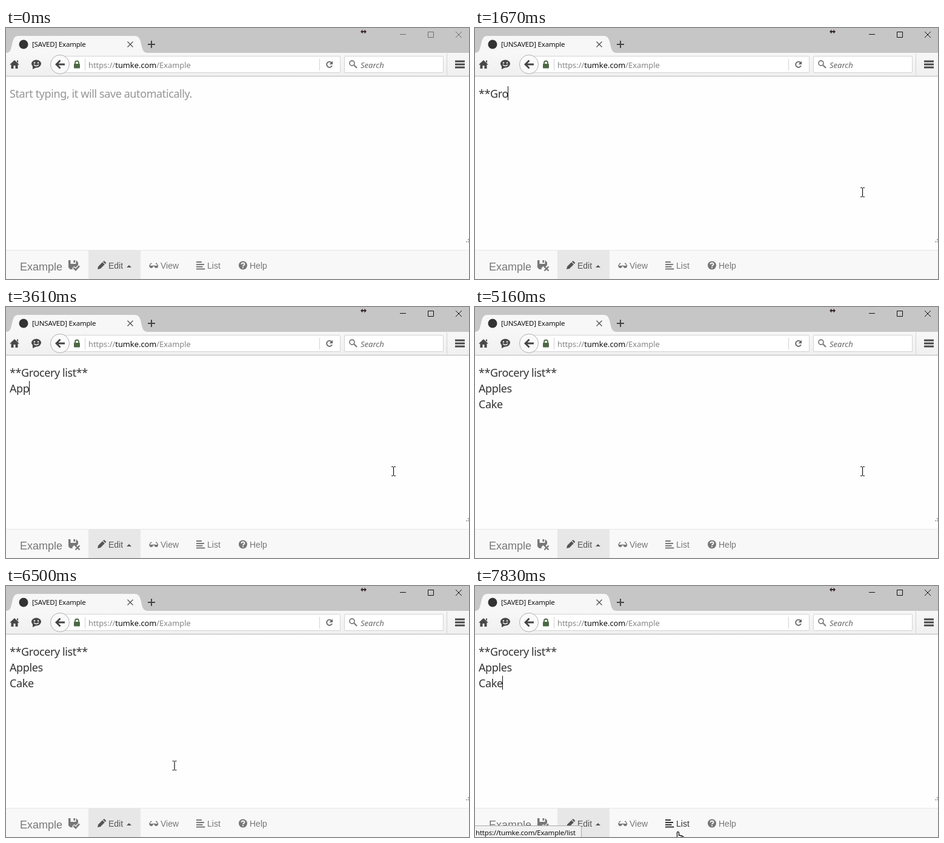
Recreate the animation shown at these times as an HTML page. Size 764x414 px, loop 8 s.

```html
<!DOCTYPE html>
<html lang="en">
<head>
<meta charset="utf-8">
<title>Notepad typing</title>
<style>
  html, body { margin: 0; width: 100%; height: 100%; overflow: hidden; background: #fefefe; }
  svg { display: block; width: 764px; height: 414px; }
  text { white-space: pre; }
  .ui { font-family: "Noto Sans", "Open Sans", sans-serif; }
  .small { font-size: 11.5px; letter-spacing: -.2px; fill: #111; }
  .url { font-size: 12.85px; fill: #858585; }
  .url tspan { fill: #111; }
  .search { font-size: 13px; font-style: italic; fill: #666; }
  .note { font-size: 18px; letter-spacing: -.4px; fill: #333; }
  .hint { fill: #959595; }
  .nav { font: 14px "Liberation Sans", Arial, sans-serif; fill: #777; stroke: none; }
  .brand { font-size: 18px; }
  .line { fill: none; }
  .item { fill: #777; stroke: #777; color: #777; }
  .active { fill: #555; stroke: #555; }
  .active .nav { fill: #555; }
  .hover { fill: #333; }
  .hover .nav { fill: #333; }
  .solid { stroke: none; }
  .controls { fill: none; stroke: #6c6c6c; }
  .controls.on { stroke: #111; }
  [hidden] { display: none; }
</style>
</head>
<body>
<svg viewBox="0 0 764 414">
  <defs>
    <linearGradient id="bar" x2="0" y2="1">
      <stop stop-color="#f7f7f7"/><stop offset="1" stop-color="#f0f0f0"/>
    </linearGradient>
  </defs>

  <!-- title bar and tab -->
  <rect width="764" height="41" fill="#c6c6c6"/>
  <rect y="41" width="764" height="38" fill="url(#bar)"/>
  <rect y="79" width="764" height="1" fill="#b9b9b9"/>
  <path d="M0 41C8 41 8 34 10 27C12 17 14 13 21 13H212C219 13 221 17 223 26C225 35 226 41 234 41Z" fill="#f7f7f7"/>
  <circle cx="29" cy="27" r="7.5" fill="#333"/>
  <text id="title" class="ui small" x="43" y="31"></text>
  <path class="line" d="M200.5 22.5l9 9m0-9l-9 9" stroke="#555" stroke-width="1.4"/>
  <path class="line" d="M234 27h12m-6-6v12" stroke="#444" stroke-width="2"/>
  <path d="M585 6l3.5-3.5v2.5h3v-2.5L595 6l-3.500 3.500v-2.500h-3v2.500z" fill="#3a2626"/>
  <g id="controls" class="controls">
    <path d="M650 10.500h10M696.500 6.500h9v9h-9zM742 6l10 10m0-10l-10 10"/>
  </g>

  <!-- toolbar -->
  <g fill="#484848">
    <path d="M14 53l8 7.500h-2.500v6.500h-4v-5h-3v5h-4v-6.500H6z"/>
    <path d="M18 53.500h2v4l-2-2z"/>
    <ellipse cx="50" cy="59" rx="8" ry="6.500"/>
    <path d="M44 62v6l6-3z"/>
    <path d="M741 53.500h16v3h-16zm0 5h16v3h-16zm0 5h16v3h-16z"/>
  </g>
  <g fill="#f5f5f5">
    <circle cx="47" cy="57.500" r="1.200"/><circle cx="53" cy="57.500" r="1.200"/>
    <path class="line" d="M46 60.500q4 4 8 0" stroke="#f5f5f5" stroke-width="1.300"/>
  </g>
  <rect x="90.500" y="46.500" width="461" height="27" rx="1.500" fill="#fff" stroke="#d4d4d4"/>
  <circle cx="89" cy="60" r="15.500" fill="#fafafa" stroke="#b0b0b0"/>
  <path class="line" d="M97 60H83m6.500-6.500L83 60l6.500 6.500" stroke="#444" stroke-width="2.800"/>
  <rect x="112" y="59" width="10" height="7.500" rx="1" fill="#4d6846"/>
  <path class="line" d="M114 60v-2.500a3 3 0 0 1 6 0V60" stroke="#4d6846" stroke-width="1.800"/>
  <path d="M130.500 51v19M517.500 51v19M727.500 42v36" stroke="#d2d2d2"/>
  <text class="ui url" x="136" y="66">https://<tspan>tumke.com</tspan>/Example</text>
  <path class="line" d="M537.500 57.500a4.600 4.600 0 1 0 .5 4.500" stroke="#666" stroke-width="1.800"/>
  <path d="M539 54.500v5.500h-5.500z" fill="#666"/>
  <rect x="558.500" y="46.500" width="163" height="27" rx="1.500" fill="#fff" stroke="#d4d4d4"/>
  <g class="line" stroke="#808080">
    <circle cx="571" cy="58" r="4" stroke-width="1.800"/>
    <path d="M574 61l5 5" stroke-width="2.400"/>
  </g>
  <text class="ui search" x="585" y="66">Search</text>

  <!-- note -->
  <text id="hint" class="ui note hint" x="6" y="115">Start typing, it will save automatically.</text>
  <g id="lines">
    <text class="ui note" x="6" y="115"></text>
    <text class="ui note" x="6" y="141"></text>
    <text class="ui note" x="6" y="167"></text>
  </g>
  <rect id="caret" width="1" height="23" fill="#111"/>
  <path d="M762 348h2v2h-2zm0 3.500h2v2h-2zm-3 0h2v2h-2z" fill="#aaa"/>

  <!-- bottom navigation -->
  <rect y="366" width="764" height="48" fill="#f8f8f8"/>
  <rect y="366" width="764" height="1" fill="#e7e7e7"/>
  <rect x="136" y="367" width="86" height="47" fill="#e7e7e7"/>
  <g class="item">
    <text class="nav brand" x="23" y="400">Example</text>
    <path class="solid" d="M103 383h3.500v6h9v-6l3.500 3.500v4.500l-4 4-2.500-2-3.500 3.500 1.500 1.500h-4.500l-3-3zM111.500 383h2.500v4h-2.500z"/>
    <path id="check" class="line" d="M111.500 395.500l3.500 3.500 6-6.500" stroke-width="2.600"/>
    <path id="cross" class="line" d="M114.500 393.500l7 7m0-7l-7 7" stroke-width="2.400"/>
  </g>
  <g class="item active">
    <path class="solid" d="M151 398l1.200-4.800 7-7 3.700 3.700-7 7zM160 385.300l1-.8q.8-.6 1.600.1l2.200 2.200q.7.800 0 1.500l-1 1z"/>
    <text class="nav" x="169" y="397">Edit</text>
    <path class="solid" d="M199 395h8l-4-4z"/>
  </g>
  <g class="item">
    <path class="solid" d="M236.500 392h6.200q.3 4-3 4t-3.200-4zM244.800 392h6.200q.2 4-3.100 4t-3.100-4z"/>
    <path class="line" d="M236.500 392.500l2.500-4h1.500M251 392.500l-2.500-4H247M242 392.500h3.500" stroke-width="1.300"/>
    <text class="nav" x="255" y="397">View</text>
  </g>
  <g id="list" class="item">
    <path class="solid" d="M314 385h9v2h-9zm0 4h13v2h-13zm0 3.700h10.500v2h-10.500zm0 3.700h14.300v2h-14.300z"/>
    <text class="nav" x="332" y="397">List</text>
  </g>
  <g class="item">
    <circle class="solid" cx="391" cy="391.500" r="7"/>
    <path class="line" d="M388.500 389.800q.2-2.300 2.600-2.300t2.500 2q0 1.200-1.300 1.900t-1.200 1.700M391.100 394.300v1.900" stroke="#f8f8f8" stroke-width="1.900"/>
    <text class="nav" x="402" y="397">Help</text>
  </g>

  <g id="status">
    <path d="M-1 395.500H173q2.500 0 2.500 2.500V415H-1z" fill="#f1f1f1" stroke="#a9a9a9"/>
    <text class="ui small" x="1" y="411">https://tumke.com/Example/list</text>
  </g>

  <!-- pointers, drawn around their hot spot -->
  <g id="beam">
    <path class="line" d="M-3.500-7.500h3m1 0h3M-3.500 7.500h3m1 0h3M0-7v14" stroke="#111" stroke-width="1.200"/>
  </g>
  <path id="arrow" d="M0 0v16l3.700-3.500 2.500 6 2.400-1-2.500-5.800h5.200z" fill="#fff" stroke="#111"/>
  <path id="hand" d="M-1.500 10V1.500q0-1.500 1.500-1.500t1.500 1.500V6l2-.3 1 1 2-.2 1 1.200 1.500.3V16H0l-4-6q0-2 2.500 0z" fill="#fff" stroke="#111" stroke-width="1.300"/>
</svg>

<script>
const LOOP = 8000;
const NOTE = '**Grocery list**\nApples\nCake';
// [ms, characters typed so far]
const KEYS = [
  [1110, 1], [1270, 2], [1420, 3], [1580, 4], [1660, 5], [1740, 6], [1890, 7], [1980, 9],
  [2130, 10], [2280, 12], [2350, 13], [2430, 14], [2680, 15], [2750, 16], [2980, 17],
  [3360, 18], [3440, 19], [3610, 20], [3760, 21], [3840, 23], [4070, 24],
  [4300, 25], [4460, 26], [4530, 27], [4610, 28]
];
const CARET_TOGGLES = [320, 870, 1110, 5160, 5690, 6220, 6750, 7270, 7830];
// [ms, x, y]
const PATH = [
  [70, 641, 369], [150, 641, 322], [240, 640, 284], [320, 639.5, 271],
  [5330, 622, 268], [5410, 599, 266], [5640, 585, 265], [6030, 440, 258], [6420, 300, 266],
  [6500, 277.5, 297], [6800, 303, 360], [7000, 328, 392], [7270, 335, 405.5]
];
const MOVE_START = 5640, MOVE_STEP = 78, NAV_TOP = 367;

const el = id => document.getElementById(id);
const show = (id, on) => el(id).toggleAttribute('hidden', !on);
const lines = [...el('lines').children];

function pointerAt(t) {
  const moving = t >= MOVE_START;
  if (moving) t -= (t - MOVE_START) % MOVE_STEP;
  const i = PATH.findLastIndex(p => p[0] <= t);
  if (i < 0) return null;
  const [t0, x, y] = PATH[i], next = PATH[i + 1];
  if (!moving || !next) return [x, y];
  const k = (t - t0) / (next[0] - t0);
  return [x + (next[1] - x) * k, y + (next[2] - y) * k];
}

function drawPointer(t) {
  const pos = pointerAt(t);
  const inNav = pos && pos[1] >= NAV_TOP;
  const onList = inNav && pos[0] >= 299 && pos[0] < 369;
  const kind = !pos ? '' : onList ? 'hand' : inNav ? 'arrow' : 'beam';
  for (const id of ['beam', 'arrow', 'hand']) {
    show(id, id === kind);
    if (id === kind) el(id).setAttribute('transform', `translate(${pos})`);
  }
  el('list').classList.toggle('hover', !!onList);
}

function drawNote(t) {
  const key = KEYS.findLast(k => k[0] <= t);
  const rows = NOTE.slice(0, key ? key[1] : 0).split('\n');
  lines.forEach((line, i) => {
    const row = rows[i] || '';
    if (line.textContent !== row) line.textContent = row;
  });
  show('hint', !key);

  const row = rows.length - 1;
  const width = rows[row] ? lines[row].getComputedTextLength() : 0;
  el('caret').setAttribute('x', Math.floor(6 + width));
  el('caret').setAttribute('y', 96 + 26 * row);
  show('caret', CARET_TOGGLES.filter(ms => ms <= t).length % 2);
}

function draw() {
  const t = performance.now() % LOOP;
  const saved = t < 1030 || t >= 5330;
  el('title').textContent = saved ? '[SAVED] Example' : '[UNSAVED] Example';
  show('check', saved);
  show('cross', !saved);
  el('controls').classList.toggle('on', t >= 320);
  show('status', t >= 6920);
  drawNote(t);
  drawPointer(t);
  requestAnimationFrame(draw);
}
draw();
</script>
</body>
</html>
```
